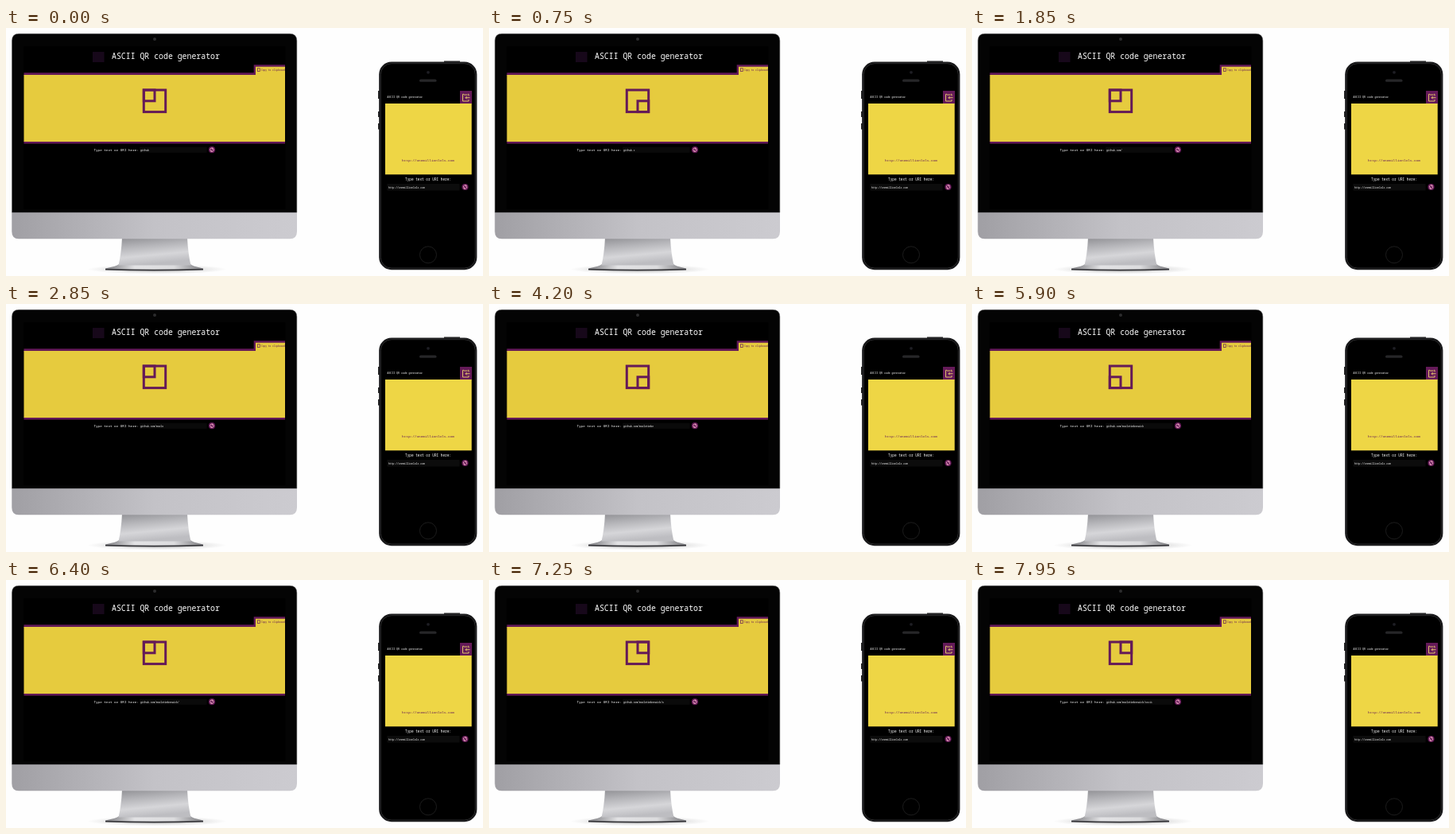
These frames come from a looping animation (600x312 px, 8000 ms). An HTML page:

```html
<!DOCTYPE html>
<html lang="en">
<head>
<meta charset="utf-8">
<title>ASCII QR code generator</title>
<style>
  html, body { margin: 0; width: 100%; height: 100%; overflow: hidden; background: #fefefe; }
  svg { display: block; width: 100%; height: 100%; }
  text { font-family: "Noto Sans Mono", "DejaVu Sans Mono", monospace; font-weight: 500; fill: #fff; white-space: pre; }
  .yellow { fill: #e6cb3e; }
  .purple { fill: #641a58; }
  .line { fill: none; stroke: #641a58; }
</style>
</head>
<body>
<svg viewBox="0 0 600 312">
  <defs>
    <linearGradient id="chin">
      <stop offset="0" stop-color="#a09fa4"/><stop offset=".5" stop-color="#c3c2c7"/><stop offset="1" stop-color="#cccbd0"/>
    </linearGradient>
    <linearGradient id="neck" x2=".25" y2="1">
      <stop offset="0" stop-color="#8f8f93"/><stop offset=".35" stop-color="#b4b4b8"/>
      <stop offset=".7" stop-color="#d6d6d9"/><stop offset="1" stop-color="#bdbdc1"/>
    </linearGradient>
    <linearGradient id="foot">
      <stop offset="0" stop-color="#77777b"/><stop offset=".3" stop-color="#e2e2e4"/>
      <stop offset=".7" stop-color="#dcdcde"/><stop offset="1" stop-color="#77777b"/>
    </linearGradient>
    <radialGradient id="shadow">
      <stop offset="0" stop-color="#777" stop-opacity=".6"/><stop offset="1" stop-color="#999" stop-opacity="0"/>
    </radialGradient>
    <g id="refresh">
      <circle r="4.1" class="purple"/>
      <path d="M-2.2.3A2.2 2.2 0 0 1 1.4-1.7M2.2-.3A2.2 2.2 0 0 1-1.4 1.7" fill="none" stroke="#eea6c0" stroke-width="1"/>
      <path d="M.6-2.9 2.7-.7.2-.5ZM-.6 2.9-2.7.7-.2.5Z" fill="#eea6c0"/>
    </g>
  </defs>

  <!-- desktop -->
  <ellipse cx="190" cy="303.500" rx="88" ry="6" fill="url(#shadow)"/>
  <path d="M125 302.500Q140 299.500 142 297H232Q234 299.500 248 302.500V304Q186 306 125 304Z" fill="url(#foot)"/>
  <path d="M125 303Q186 304.600 248 303V304.500Q186 306.500 125 304.500Z" fill="#333337"/>
  <path d="M146 264H228Q229 284 232.500 298.500H141.500Q145 284 146 264Z" fill="url(#neck)"/>
  <path d="M7.300 232H366V256Q366 265.300 357 265.300H16Q7.300 265.300 7.300 256Z" fill="url(#chin)"/>
  <path d="M7.500 232V16Q7.500 7.300 16 7.300H357Q365.800 7.300 365.800 16V232Z" fill="#040404" stroke="#4a4a4c" stroke-width=".5"/>
  <rect x="22" y="23" width="329.500" height="205"/>
  <circle cx="187" cy="14" r="2" fill="#2c2c2e"/>
  <rect x="109" y="30" width="14.500" height="13" fill="#17081a"/>
  <text x="133" y="39.300" font-size="9.850">ASCII QR code generator</text>
  <path class="purple" d="M22.500 56.300H311.700V46.300H351V60H22.500ZM22.500 142H351V145.400H22.500Z"/>
  <path class="yellow" d="M22.500 59H314V48.700H351V143H22.500Z"/>
  <rect x="316.300" y="50.800" width="3" height="3.800" class="line" stroke-width=".7"/>
  <text x="321" y="53.700" font-size="2.950" style="fill:#641a58">Copy to clipboard</text>
  <g class="line" stroke-width="3">
    <rect x="173.300" y="78" width="27.400" height="27.600"/>
    <rect id="corner" width="13.700" height="13.800"/>
  </g>
  <text x="110.500" y="154.800" font-size="4.280">Type text or URI here:</text>
  <rect x="168" y="149.800" width="84.500" height="7" fill="#0a0a0a"/>
  <text id="typed" x="169" y="154.700" font-size="3.030"></text>
  <use href="#refresh" x="259" y="153.200"/>

  <!-- phone -->
  <path d="M468.900 79V89M468.900 105V112M468.900 120V127.500" stroke="#222" stroke-width="1.800"/>
  <path d="M551 42.300H571" stroke="#333" stroke-width="1.800"/>
  <rect x="469.900" y="43.300" width="121.800" height="260.200" rx="15" fill="#000" stroke="#1c1c1e" stroke-width="1.400"/>
  <rect x="471.300" y="44.700" width="119" height="257.400" rx="13.600" fill="none" stroke="#58585a" stroke-width=".5"/>
  <circle cx="531" cy="55.800" r="1.900" fill="#1e1e24"/>
  <rect x="520" y="64.600" width="21.500" height="3.200" rx="1.600" fill="#262628"/>
  <circle cx="531" cy="285.300" r="10.500" fill="#000" stroke="#242424" stroke-width=".8"/>
  <text x="479.500" y="87.700" font-size="3.230">ASCII QR code generator</text>
  <rect x="571" y="79" width="15" height="16.500" class="purple"/>
  <path d="M576 83.300H574.500V92H582V90M581 83.300H582V85.500M576 84H580.500M583.500 87.700H578M579.700 86 578 87.700 579.700 89.400" fill="none" stroke="#e0bf6a"/>
  <rect x="477" y="95" width="108.700" height="89.300" fill="#eed645"/>
  <text x="498" y="167.800" font-size="4.400" style="fill:#641a58;font-family:'Liberation Mono',monospace">http://onemillionlols.com</text>
  <text x="502" y="192.400" font-size="4.400">Type text or URI here:</text>
  <rect x="479.500" y="196" width="91" height="8.500" fill="#0c0c0c"/>
  <text x="481" y="201.900" font-size="3.050">http://onemillionlols.com</text>
  <use href="#refresh" x="577.500" y="200"/>
</svg>
<script>
  const LOOP = 8000;
  const url = "github.com/marlotimberwick/ascii";
  // [time, letters typed]
  const typing = [[0, 6], [1850, 11], [2850, 16], [3850, 21], [4350, 22], [5300, 26], [6000, 27], [7100, 28], [7900, 32], [LOOP, 32]];
  // [first step, last step, number of steps]; the spinner stalls between bursts
  const bursts = [[100, 1850, 36], [2000, 2500, 11], [2650, 2850, 5], [3000, 3350, 8], [3600, 3900, 7], [4050, 4350, 6],
    [4500, 5300, 14], [5400, 6000, 15], [6300, 7100, 14], [7200, 7750, 11], [7900, 7950, 2]];

  const corner = document.getElementById("corner");
  const typed = document.getElementById("typed");

  function letters(t) {
    const i = typing.findIndex(p => p[0] > t);
    const [t0, n0] = typing[i - 1], [t1, n1] = typing[i];
    return Math.floor(n0 + (n1 - n0) * (t - t0) / (t1 - t0));
  }

  function spinnerStep(t) {
    let step = 0;
    for (const [start, end, count] of bursts) {
      if (t < start) break;
      const done = Math.min(1, (t - start) / (end - start));
      step += 1 + Math.floor(done * (count - 1) + 1e-6);
    }
    return step % 4;
  }

  function draw(now) {
    const t = now % LOOP;
    const step = spinnerStep(t); // clockwise from top left
    corner.setAttribute("x", step === 1 || step === 2 ? 187 : 173.3);
    corner.setAttribute("y", step > 1 ? 91.8 : 78);
    typed.textContent = url.slice(0, letters(t));
  }

  const begin = performance.now();
  function frame() {
    draw(performance.now() - begin);
    requestAnimationFrame(frame);
  }
  frame();
</script>
</body>
</html>
```
